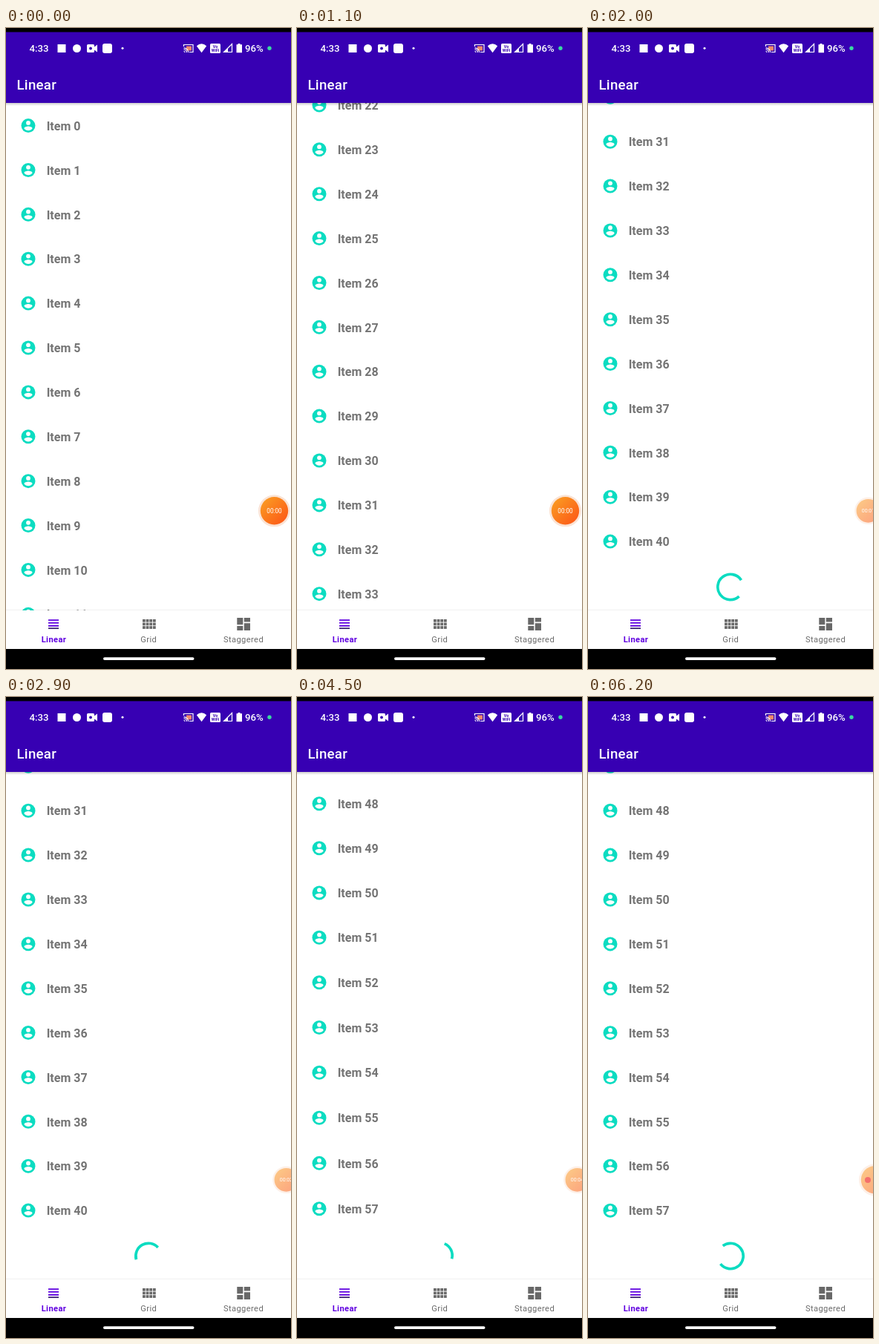
These frames come from a looping animation (384 by 864 pixels, 6300 ms). An HTML page:

```html
<!DOCTYPE html>
<html lang="en">
<head>
<meta charset="utf-8">
<title>Linear list</title>
<style>
  html, body { margin: 0; width: 100%; height: 100%; overflow: hidden; background: #fff; }
  svg { display: block; width: 100%; height: 100%; }
  text { font-family: Roboto, Arial, sans-serif; }
  .status { font-size: 13.2px; font-weight: 500; fill: #fff; }
  .title { font-size: 18.7px; font-weight: 500; letter-spacing: .24px; fill: #fff; }
  .item { font-size: 16px; font-weight: 700; fill: #747474; }
  .tab { font-size: 11.2px; letter-spacing: .37px; text-anchor: middle; fill: #6c6c6c; }
  .tab.on { font-weight: 700; fill: #6002e0; }
  .tiny { font-size: 5.4px; font-weight: 700; text-anchor: middle; fill: #3700b3; }
  .clock { font-size: 8.2px; text-anchor: middle; fill: #fff; }
</style>
</head>
<body>
<svg viewBox="0 0 384 864" preserveAspectRatio="none">
  <defs>
    <clipPath id="view"><rect y="101" width="384" height="684"/></clipPath>
    <linearGradient id="shade" x2="0" y2="1">
      <stop stop-color="#000" stop-opacity=".2"/>
      <stop offset="1" stop-color="#000" stop-opacity="0"/>
    </linearGradient>
    <linearGradient id="amber" x2="1" y2="1">
      <stop offset=".1" stop-color="#fa9a22"/>
      <stop offset=".9" stop-color="#fc5a17"/>
    </linearGradient>
    <g id="person">
      <circle r="9.5" fill="#0bdcc1"/>
      <circle cy="-3.7" r="2.9" fill="#fff"/>
      <path d="M-5.6 3.7C-5.5 1.9-1.9 .9 0 .9S5.5 1.9 5.6 3.7C4.4 5.5 2.3 6.7 0 6.7S-4.4 5.5-5.6 3.7z" fill="#fff"/>
    </g>
  </defs>

  <rect width="384" height="864" fill="#fff"/>
  <g clip-path="url(#view)">
    <g id="rows"></g>
    <path id="spin" fill="none" stroke="#0bdcc1" stroke-width="3.7"/>
  </g>

  <rect y="101" width="384" height="4" fill="url(#shade)"/>
  <rect width="384" height="6" fill="#000"/>
  <rect y="5.5" width="384" height="95.5" fill="#3700b3"/>
  <text class="title" x="14.5" y="83">Linear</text>

  <g fill="#fff">
    <text class="status" x="31.6" y="32">4:33</text>
    <rect x="69.5" y="22" width="11" height="11"/>
    <circle cx="95.5" cy="27.5" r="5.5"/>
    <path d="M110.5 22h7q1.500 0 1.500 1.500v2l4-3v10l-4-3v2q0 1.500-1.500 1.500h-7q-1.500 0-1.500-1.500v-8q0-1.500 1.500-1.500z"/>
    <circle cx="114" cy="27.500" r="1.900" fill="#3700b3"/>
    <rect x="130" y="21" width="13" height="13" rx="3"/>
    <circle cx="157" cy="27.300" r="1.500"/>
    <rect x="243" y="24.500" width="7" height="6" fill="#f0896c"/>
    <path d="M239.500 25v-2.500h12.500v10h-5M239.500 31.500a1.500 1.500 0 0 1 1.500 1.500M239.500 29a4 4 0 0 1 4 4M239.500 26.800a6.200 6.200 0 0 1 6.200 6.200" fill="none" stroke="#fff" stroke-width="1.200"/>
    <path d="M263.500 33.300L256.800 24.300Q263.500 18.300 270.200 24.300z"/>
    <rect x="275" y="21" width="14" height="13" rx="1.500"/>
    <text class="tiny" x="282" y="26.800">Vo</text>
    <text class="tiny" x="282" y="32.300">WiFi</text>
    <path d="M293.500 32.500L304.500 21.500V32.500z" fill="none" stroke="#fff" stroke-width="1.200"/>
    <path d="M293 33L299 27V33z"/>
    <path d="M312.500 21h3v1.300h2.500v11h-7.500v-11h2z"/>
    <text class="status" x="322" y="31.500">96%</text>
    <circle cx="355" cy="27.300" r="2.700" fill="#38d9a0"/>
  </g>

  <rect y="783.800" width="384" height="1.200" fill="#000" opacity=".05"/>
  <rect y="785" width="384" height="52" fill="#fff"/>
  <path d="M57 798.100h14M57 801.900h14M57 805.700h14" stroke="#6002e0" stroke-width="1.900"/>
  <path d="M57 809.200h14" stroke="#32186a" stroke-width="1.700"/>
  <g id="cells" fill="#686868"></g>
  <path d="M311.300 795h8v9.200h-8zM320.800 795h8.200v5.500h-8.200zM311.300 806h8v6h-8zM320.800 802.200h8.200v9.800h-8.200z" fill="#686868"/>
  <text class="tab on" x="64.500" y="828">Linear</text>
  <text class="tab" x="192.200" y="828">Grid</text>
  <text class="tab" x="320" y="828">Staggered</text>
  <rect y="837" width="384" height="27" fill="#000"/>
  <rect x="131" y="848.200" width="122.500" height="3.800" rx="1.900" fill="#fff"/>

  <g id="fab">
    <circle r="21.500" fill="#e9813f" opacity=".22"/>
    <circle r="18.700" fill="url(#amber)"/>
    <text id="clock" class="clock" y="3"></text>
  </g>
  <circle id="rec" cx="377" cy="651" r="4" fill="#f4706c"/>
</svg>
<script>
const LOOP = 6300, STEP = 100;
const PITCH = 59.88, FIRST = 132, BOTTOM = 785;
const PAGE_ADDED = 3500, DOCK_HIDDEN = 5700;

// [time, value] pairs, linear in between
const SCROLL = [[500, 0], [600, 130], [700, 420], [800, 704], [900, 945], [1000, 1155],
  [1100, 1345], [1200, 1510], [1300, 1655], [1400, 1785.9], [1450, 1834.7],
  [4100, 1834.7], [4200, 1950], [4300, 2400], [4400, 2804], [4440, 2852.6]];
const STRETCH = [[1450, 0], [1500, .7], [1600, .5], [1900, 0],
  [4440, 0], [4500, 1], [4600, .75], [4700, .4], [4900, 0]];
const FAB_X = [[1700, 361.5], [2000, 377.5], [5500, 377.5], [5700, 386.5]];
const FAB_SIZE = [[1700, 1], [2000, .85], [5500, .85], [5700, 1]];
const FAB_ALPHA = [[1700, 1], [2000, .55]];

const $ = id => document.getElementById(id);
const NS = "http://www.w3.org/2000/svg";

function add(parent, tag, attrs) {
  const el = document.createElementNS(NS, tag);
  for (const k in attrs) el.setAttribute(k, attrs[k]);
  return parent.appendChild(el);
}

function track(keys, t) {
  const i = keys.findIndex(k => k[0] > t);
  if (i === 0) return keys[0][1];
  if (i < 0) return keys[keys.length - 1][1];
  const [t0, a] = keys[i - 1], [t1, b] = keys[i];
  return a + (b - a) * (t - t0) / (t1 - t0);
}

function bezier(x1, x2, x) {
  if (x <= 0) return 0;
  if (x >= 1) return 1;
  let lo = 0, hi = 1, u = .5;
  for (let i = 0; i < 24; i++) {
    u = (lo + hi) / 2;
    const v = 1 - u;
    if (3 * u * v * v * x1 + 3 * u * u * v * x2 + u * u * u < x) lo = u; else hi = u;
  }
  return u * u * (3 - 2 * u);
}

for (let i = 0; i < 12; i++)
  add($("cells"), "rect", { x: 184 + i % 4 * 4.65, y: 797 + Math.floor(i / 4) * 4.6, width: 3.8, height: 3.7 });

const rows = Array.from({ length: 14 }, () => {
  const g = add($("rows"), "g", {});
  add(g, "use", { href: "#person", x: 30, y: -.4 });
  return { g, label: add(g, "text", { class: "item", x: 54.7, y: 5.8 }) };
});

// overscroll pulls content away from the bottom edge
function stretch(y, k) {
  const d = BOTTOM - y;
  return y - k * (.0291 * d - 2.22e-5 * d * d);
}

function arc(cy, age) {
  const p = age / 1333 % 1, r = 17.2;
  const tail = .75 * bezier(.4, .2, p * 2 - 1);
  const head = .75 * bezier(.2, .1, p * 2) + .03;
  const base = age / 4444 * 2 + p * .25 - .25;
  const point = f => {
    const a = (base + f) * 2 * Math.PI;
    return (192 + r * Math.cos(a)).toFixed(2) + " " + (cy + r * Math.sin(a)).toFixed(2);
  };
  return `M${point(tail)}A${r} ${r} 0 ${head - tail > .5 ? 1 : 0} 1 ${point(head)}`;
}

function draw(t) {
  const scroll = track(SCROLL, t), k = track(STRETCH, t);
  const added = t >= PAGE_ADDED, last = added ? 57 : 40;
  const top = Math.max(0, Math.floor((scroll - 70) / PITCH));

  rows.forEach(({ g, label }, i) => {
    const n = top + i, y = stretch(FIRST + n * PITCH - scroll, k);
    const show = n <= last && y < BOTTOM + 20;
    g.setAttribute("visibility", show ? "visible" : "hidden");
    if (!show) return;
    g.setAttribute("transform", `translate(0 ${y.toFixed(2)})`);
    g.setAttribute("opacity", n > 40 && t < PAGE_ADDED + STEP ? .45 : 1);
    label.textContent = "Item " + n;
  });

  const cy = stretch(FIRST + last * PITCH + 61 - scroll, k);
  const born = added ? 4400 : 1400;
  $("spin").setAttribute("d", t >= born && cy < BOTTOM + 20 ? arc(cy, t - born) : "");

  const hidden = t >= DOCK_HIDDEN;
  $("fab").setAttribute("transform", `translate(${track(FAB_X, t)} 650.8) scale(${track(FAB_SIZE, t)})`);
  $("fab").setAttribute("opacity", track(FAB_ALPHA, t));
  $("clock").textContent = hidden ? "" : "00:0" + Math.max(0, Math.floor((t - 250) / 1000));
  $("rec").setAttribute("visibility", hidden ? "visible" : "hidden");
}

const start = performance.now();
function tick() {
  const t = (performance.now() - start) % LOOP;
  draw(Math.floor(t / STEP) * STEP);
  requestAnimationFrame(tick);
}
tick();
</script>
</body>
</html>
```
